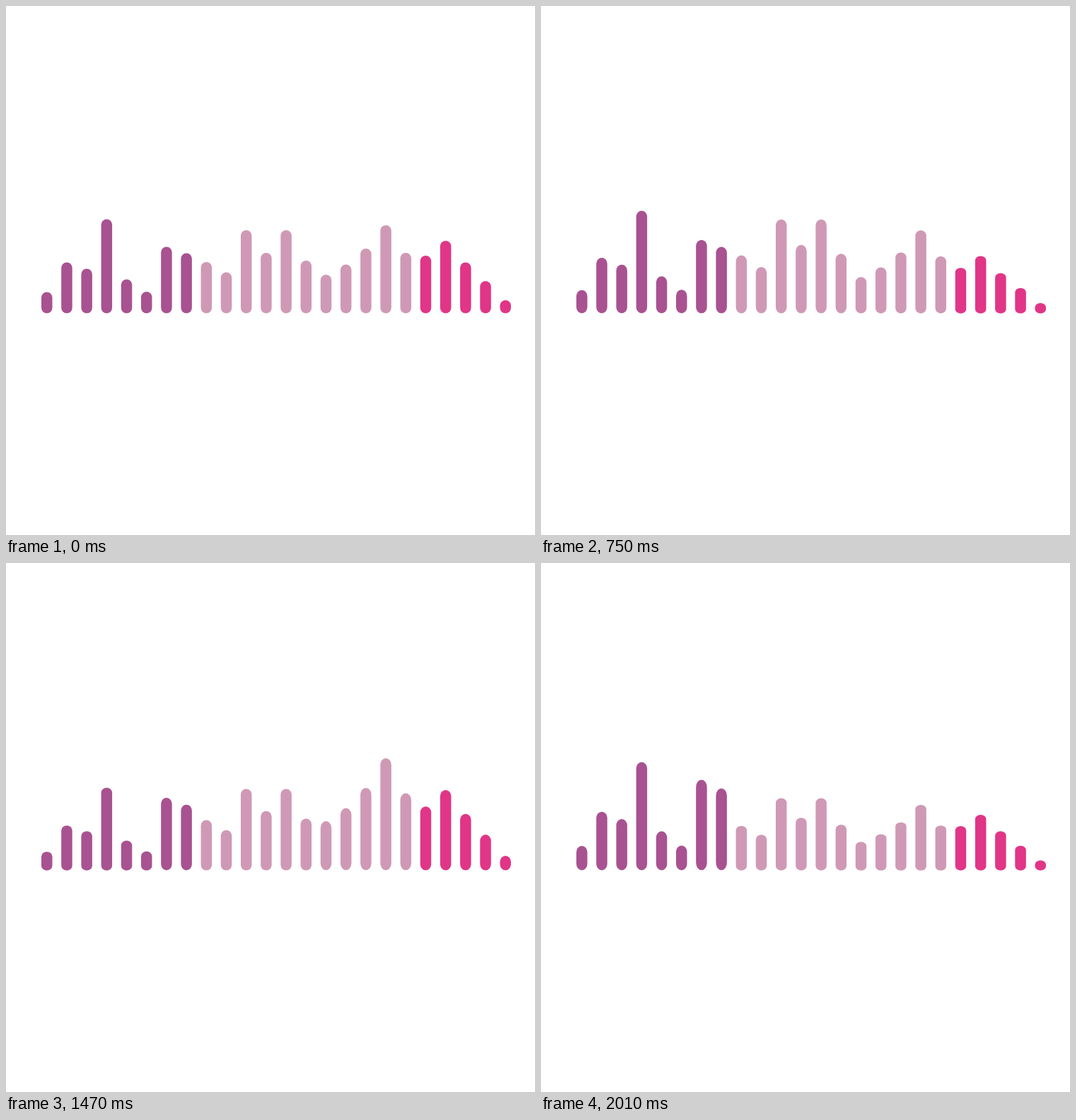
Recreate the animation shown at these times as an HTML page. Size 748x748 px, loop 2.08 s.

```html
<!DOCTYPE html>
<html lang="en">
<head>
<meta charset="utf-8">
<title>Equalizer</title>
<style>
  html, body { margin: 0; width: 100%; height: 100%; overflow: hidden; background: #fff; }
  svg { display: block; width: 100%; height: 100%; }
</style>
</head>
<body>
<svg id="stage" viewBox="0 0 748 748"></svg>
<script>
const LOOP = 2080, STEP = 30;
const PIVOT = 435.5, LIFT = 0.9, LEFT = 50, PITCH = 28.196, WIDTH = 15.5;
const PLUM = '#a85291', MAUVE = '#cf99b5', PINK = '#e13587';

// All groups start at rest and reach their next stretch, in percent, on shared beats.
const BEATS = [0, 210, 510, 990, 1260, 1680, 2010];
const groups = [
  { color: PLUM, bars: [30, 72, 63, 133, 48, 30.5], stretch: [100, 123, 89, 129, 86, 90, 115] },
  { color: PLUM, bars: [94, 85], stretch: [100, 100, 137, 84, 112, 106, 136] },
  { color: MAUVE, bars: [72.5, 58, 117.5, 85.5, 117.5, 74.5], stretch: [100, 129, 110, 116, 87, 109, 87] },
  { color: MAUVE, bars: [54.5, 69, 91.5, 124.5, 85.5], stretch: [100, 126, 84.5, 104, 131, 123.5, 74.5] },
  { color: PINK, bars: [81.5, 102.5, 72, 45.5, 18.6], stretch: [100, 159, 51.5, 107, 101.5, 120, 77] }
];

function svgNode(tag, attrs, parent) {
  const node = document.createElementNS('http://www.w3.org/2000/svg', tag);
  for (const name in attrs) node.setAttribute(name, attrs[name]);
  return parent.appendChild(node);
}

const ease = u => u * u * (3 - 2 * u);

function stretchAt(stretch, t) {
  const next = BEATS.findIndex(beat => beat > t);
  if (next < 0) return stretch[stretch.length - 1];
  const from = BEATS[next - 1], u = (t - from) / (BEATS[next] - from);
  return stretch[next - 1] + (stretch[next] - stretch[next - 1]) * ease(u);
}

const stage = document.getElementById('stage');
let x = LEFT;
for (const group of groups) {
  group.node = svgNode('g', { fill: group.color }, stage);
  for (const height of group.bars) {
    svgNode('rect', { x, y: -height - LIFT, width: WIDTH, height, rx: WIDTH / 2, ry: WIDTH / 2 }, group.node);
    x += PITCH;
  }
}

function draw(time) {
  const t = Math.floor((time % LOOP) / STEP) * STEP;
  for (const { node, stretch } of groups) {
    node.setAttribute('transform', `translate(0 ${PIVOT}) scale(1 ${stretchAt(stretch, t) / 100})`);
  }
}

const start = performance.now();
function tick() {
  draw(performance.now() - start);
  requestAnimationFrame(tick);
}
tick();
</script>
</body>
</html>
```
